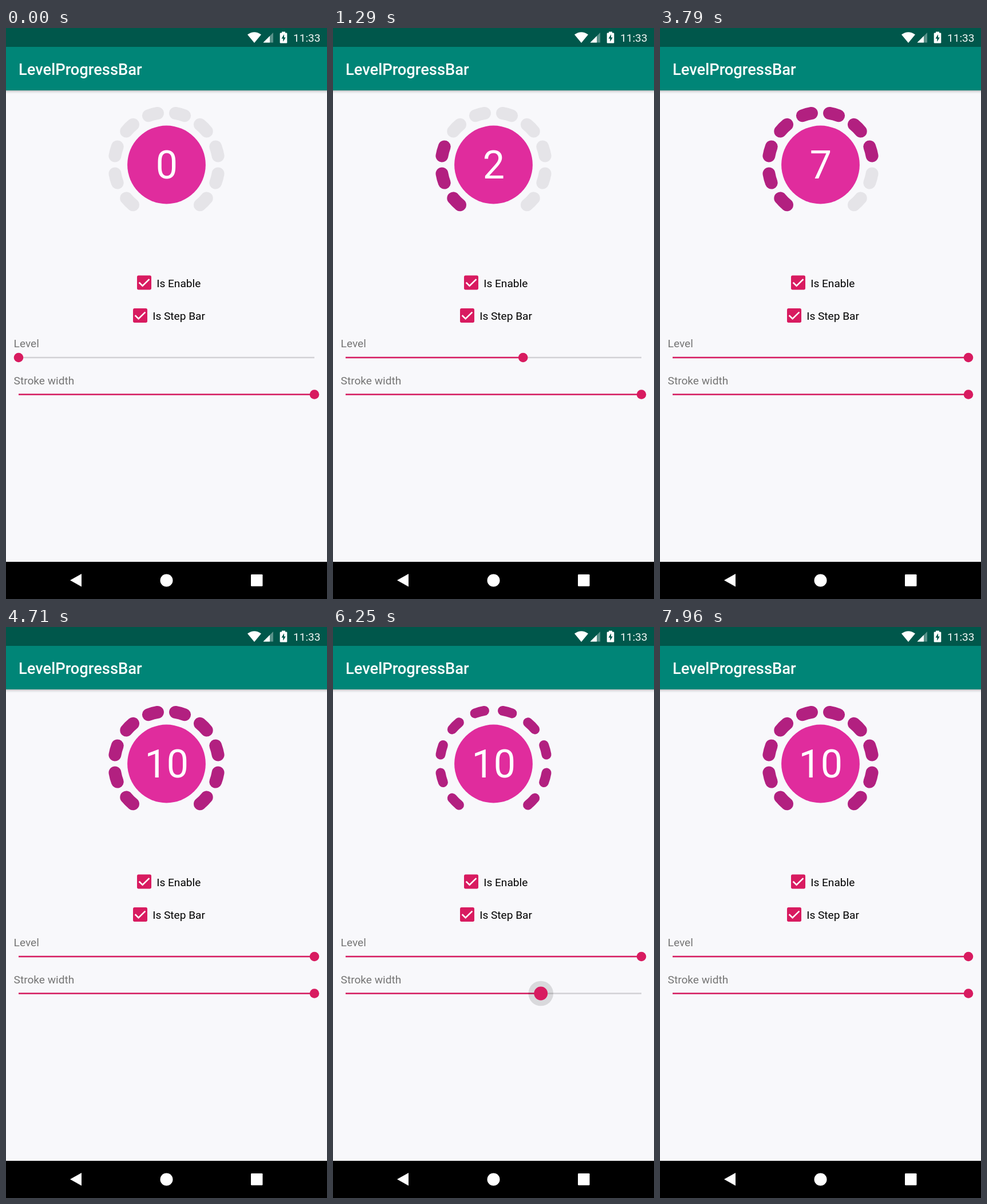
An HTML page with a canvas for the animation above (8000 ms loop, 561x998 px).

```html
<!DOCTYPE html>
<html lang="en">
<head>
<meta charset="utf-8">
<title>LevelProgressBar</title>
<style>
  html, body { margin: 0; width: 100%; height: 100%; overflow: hidden; background: #f8f8fb; }
  canvas { display: block; width: 100vw; height: 100vh; }
</style>
</head>
<body>
<canvas id="stage" width="561" height="998"></canvas>
<script>
const W = 561, H = 998, LOOP = 8000;
const ACCENT = '#d81b60', TRACK = '#d2d1d5';
const RING = { x: 280.5, y: 239, outer: 102.4, steps: 10 };
const TRACK_X = 22, TRACK_W = 517;
const ctx = document.getElementById('stage').getContext('2d');

const clamp = (v, lo = 0, hi = 1) => Math.min(hi, Math.max(lo, v));
const rad = deg => deg * Math.PI / 180;

// Eased value through [time, value] stops.
function track(t, stops) {
  if (t <= stops[0][0]) return stops[0][1];
  for (let i = 1; i < stops.length; i++) {
    const [t0, a] = stops[i - 1], [t1, b] = stops[i];
    if (t < t1) {
      const k = (t - t0) / (t1 - t0);
      return a + (b - a) * k * k * (3 - 2 * k);
    }
  }
  return stops[stops.length - 1][1];
}

// Touch feedback between down and up, 0 to 1.
function press(t, down, up, rise) {
  return t < up ? clamp((t - down) / rise) : clamp(1 - (t - up) / 150);
}

const LEVEL_TAPS = [[720, 880], [3400, 3560]];
const DRAG = [5400, 7600];
const DRAG_STOPS = [[5400, 0.78], [5460, 0.78], [6250, 0.66], [6850, 0.2], [7500, 1]];

function level(t) {
  const first = clamp((t - 720) / 250, 0, 6);
  return first + clamp((t - 3400) / 250, 0, 4);
}

function levelTarget(t) {
  return t < 720 ? 0 : t < 3400 ? 0.6 : 1;
}

function strokeRatio(t) {
  return t < DRAG[0] ? 1 : track(t, DRAG_STOPS);
}

function rect(x, y, w, h, color, r = 0) {
  ctx.fillStyle = color;
  ctx.beginPath();
  ctx.roundRect(x, y, w, h, r);
  ctx.fill();
}

function disc(x, y, r, color) {
  ctx.fillStyle = color;
  ctx.beginPath();
  ctx.arc(x, y, r, 0, 2 * Math.PI);
  ctx.fill();
}

function poly(points, color) {
  ctx.fillStyle = color;
  ctx.beginPath();
  points.forEach(([x, y]) => ctx.lineTo(x, y));
  ctx.closePath();
  ctx.fill();
}

function text(str, x, y, size, color, weight = 400, align = 'left') {
  ctx.font = `${weight} ${size}px Roboto, sans-serif`;
  ctx.textAlign = align;
  ctx.fillStyle = color;
  ctx.fillText(str, x, y);
}

function statusBar() {
  const bar = '#00574b';
  rect(0, 0, W, 33, bar);
  // Wi-Fi
  ctx.fillStyle = '#fff';
  ctx.beginPath();
  ctx.moveTo(434, 26);
  ctx.lineTo(422, 11.5);
  ctx.quadraticCurveTo(434, 3, 446, 11.5);
  ctx.closePath();
  ctx.fill();
  // Signal
  poly([[449.5, 25.5], [467, 25.5], [467, 8]], 'rgba(255,255,255,.35)');
  poly([[449.5, 25.5], [461, 25.5], [461, 14]], '#fff');
  // Battery
  rect(482, 6.5, 6, 4, '#fff');
  rect(478.7, 8.5, 12.6, 18, '#fff', 1.3);
  poly([[486, 11], [481.5, 18.5], [484.3, 18.5], [484.3, 24], [488.8, 16.5], [486, 16.5]], bar);
  text('11:33', 502, 24, 19.1, '#f4f8f7');
}

function toolbar() {
  const shade = ctx.createLinearGradient(0, 109, 0, 115);
  shade.addColorStop(0, 'rgba(0,0,0,.26)');
  shade.addColorStop(0.4, 'rgba(0,0,0,.09)');
  shade.addColorStop(1, 'rgba(0,0,0,0)');
  rect(0, 109, W, 6, shade);
  rect(0, 33, W, 76, '#008577');
  text('LevelProgressBar', 22, 81.5, 27.3, '#fff', 500);
}

function ring(value, ratio) {
  const { x, y, outer, steps } = RING;
  const width = 7.3 + 14.7 * ratio;
  const r = outer - width / 2;
  const lit = value > 0 ? Math.min(steps, Math.floor(value) + 1) : 0;
  ctx.lineWidth = width;
  ctx.lineCap = 'round';
  for (let i = 0; i < steps; i++) {
    const mid = 135 + i * 30;
    ctx.strokeStyle = i < lit ? '#b22080' : '#e5e4e8';
    ctx.beginPath();
    ctx.arc(x, y, r, rad(mid - 5.2), rad(mid + 5.2));
    ctx.stroke();
  }
  disc(x, y, 68.4, '#e02c9d');
  text(String(Math.floor(value)), x + 0.3, 263, 68.2, '#fff', 400, 'center');
}

function checkbox(x, y, label) {
  rect(x, y, 25, 25, ACCENT, 2.7);
  ctx.strokeStyle = '#fff';
  ctx.lineWidth = 2.6;
  ctx.lineCap = 'butt';
  ctx.lineJoin = 'miter';
  ctx.beginPath();
  ctx.moveTo(x + 3.6, y + 12.3);
  ctx.lineTo(x + 9.6, y + 18.2);
  ctx.lineTo(x + 21.4, y + 6.6);
  ctx.stroke();
  text(label, x + 34.2, y + 20, 19.1, '#000');
}

function slider(y, label, ratio, grow, halo) {
  const x = TRACK_X + TRACK_W * ratio;
  text(label, 13.6, y - 18, 19.1, '#757575');
  rect(TRACK_X, y - 1.3, TRACK_W, 2.6, TRACK);
  rect(TRACK_X, y - 1.3, x - TRACK_X, 2.6, ACCENT);
  if (halo > 0) disc(x, y, 21.8, `rgba(0,0,0,${0.125 * halo})`);
  disc(x, y, 8.3 + 3.6 * grow, ACCENT);
}

function navBar() {
  rect(0, 933, W, 65, '#000');
  poly([[112, 965.3], [132, 954], [132, 976.6]], '#fff');
  disc(280.5, 965.5, 11, '#fff');
  rect(428, 955, 20.5, 20.8, '#fff', 1.3);
}

function draw(t) {
  const taps = rise => Math.max(...LEVEL_TAPS.map(([down, up]) => press(t, down, up, rise)));
  const ratio = strokeRatio(t);
  rect(0, 0, W, H, '#f8f8fb');
  statusBar();
  toolbar();
  ring(level(t), ratio);
  checkbox(229, 432.5, 'Is Enable');
  checkbox(222, 490, 'Is Step Bar');
  slider(576, 'Level', levelTarget(t), taps(70), taps(260));
  slider(640.5, 'Stroke width', ratio, press(t, ...DRAG, 70), press(t, ...DRAG, 260));
  navBar();
}

function tick() {
  draw(performance.now() % LOOP);
  requestAnimationFrame(tick);
}
tick();
</script>
</body>
</html>
```
